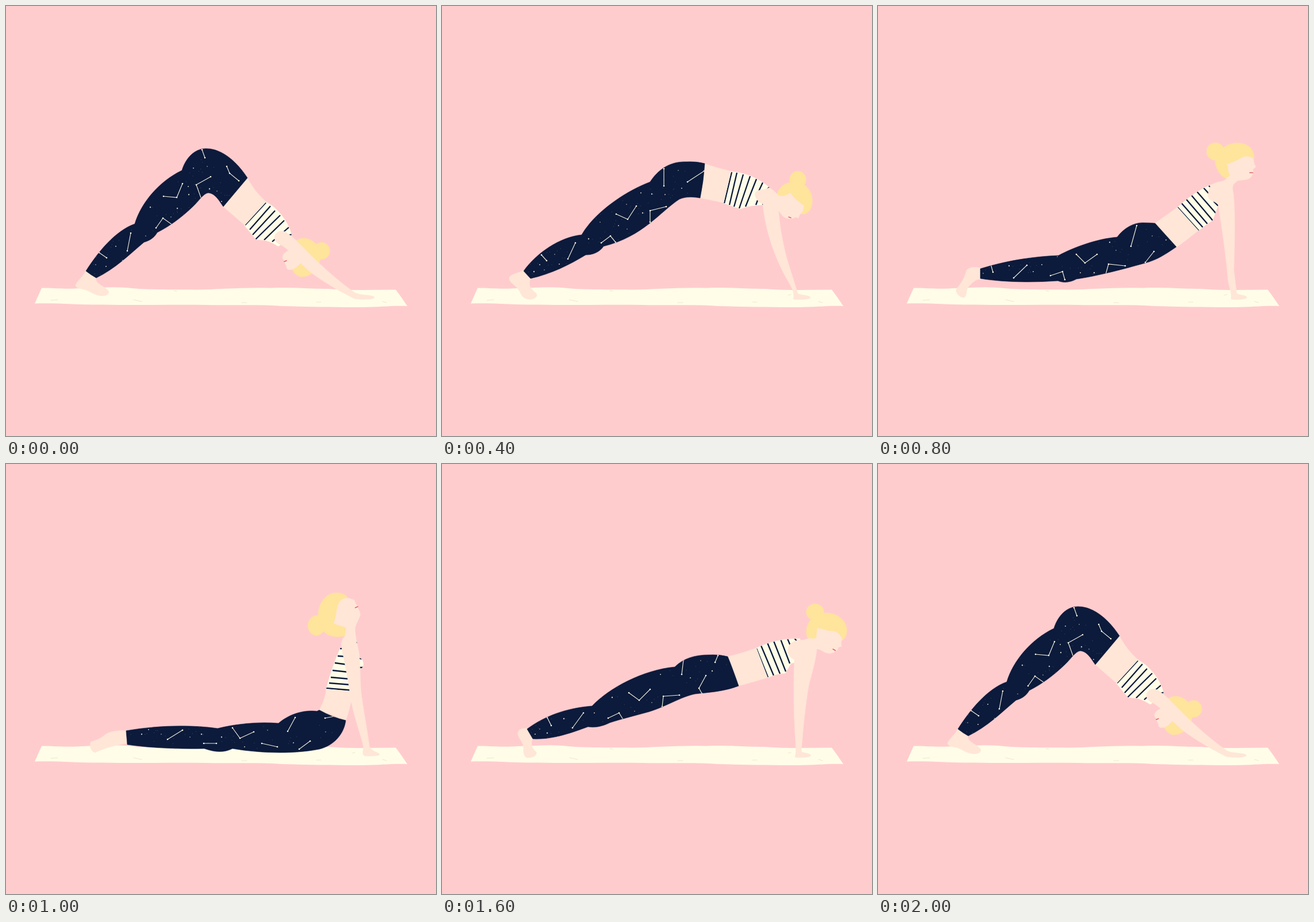
Animation of 748 by 748 pixels, one loop 2200 ms. Source, as an HTML page:

```html
<!DOCTYPE html>
<html lang="en">
<head>
<meta charset="utf-8">
<title>Yoga flow</title>
<style>
html, body { margin: 0; width: 100%; height: 100%; overflow: hidden; background: #ffccce; }
svg { display: block; width: 100vw; height: 100vh; }
</style>
</head>
<body>
<svg id="stage" viewBox="0 0 748 748">
  <rect width="748" height="748" fill="#ffccce"/>
  <path fill="#fffde8" d="M62 490.5C85 490 100 493 130 491C160 490 185 488 210 490C240 494 290 493 330 493.500C370 493 410 489 460 490.500C500 489 525 492 560 492C600 495 640 494 678 493.500Q689 508 698 522C670 521 650 524 620 524C570 524 520 523 480 522C440 519 400 521 350 520C290 519 230 521 170 519.500C130 520 85 516 50 517.500Z"/>
  <g fill="none" stroke="#efe6cf" stroke-width="1" stroke-linecap="round">
    <path d="M292 495l5 1M222 511l14 3M602 503l5-1M78 512l12-1M410 516l9 0M655 514l7 2M540 515l8 0"/>
  </g>
</svg>
<script>
const NS = "http://www.w3.org/2000/svg";
const NAVY = "#0c1a3b", SKIN = "#ffe6d7", HAIR = "#ffe49b", CREAM = "#fffde8", LIPS = "#e2626a";
const stage = document.getElementById("stage");

// bun: cx cy rx ry; lines and dots: points in stage units
const poses = {
  dog: {
    bun: [549, 426, 14.5, 15],
    hair: "M497 425C498 412 507 404 518 404C534 405 546 417 547 434C547 455 532 471 514 471C506 470 500 464 497 455Z",
    face: "M500 424C489 425 481 430 481 438L484 443L486 449L488 452C487 458 492 460 498 458C504 456 509 451 514 445L512 428Z",
    lips: "M484 444.500L488 443",
    foot: "M139 460C134 472 124 477 121 486C122 492 132 491 142 495C151 500 160 505 171 504C181 502 181 496 173 491C163 484 154 480 157 472Z",
    torso: "M420 299C428 315 440 330 453 341L416 382L378 349Z",
    legs: "M139 461C160 428 190 391 224 379C234 345 264 306 306 286C312 266 327 248 348 248C377 248 403 273 420 299L378 349C371 339 364 326 352 325C343 326 335 340 325 349C304 369 286 382 263 394C258 403 250 408 240 411C215 432 190 457 157 473Q148 468 139 461Z",
    top: "M452.500 341C474 352 492 377 497 399L474 418C466 414 456 407 445 407L435 406L415 382Z",
    stripes: "M452 342L416 381M460 348L424 389M468 356L429 398M477 364L434 406M484 373L449 407M492 385L463 410M499 397L490 399",
    arm: "M467 404C467 394 477 389 486 393C496 399 506 409 518 421C542 446 573 475 607 499C618 504 639 502 641 507C639 511 618 511 606 509C586 499 560 485 531 464C512 449 494 425 481 417C474 414 468 410 467 404Z",
    lines: "341,250 346,264;356,297 331,311 340,336;274,331 297,333 307,309;384,279 389,291 405,304;261,386 273,369 290,381;217,395 211,426;162,429 175,438",
    dots: "350,279 326,282 318,328 367,322 317,314 251,350 156,450 191,418 298,352 287,367 174,453 203,443 243,400 375,340 354,318"
  },
  pike: {
    bun: [619, 302, 14.5, 15],
    hair: "M583 332C583 315 599 305 616 306C635 308 645 325 644 341C643 355 636 362 627 362L600 340Z",
    face: "M580 326C592 336 602 327 606 325C612 335 622 342 629 347C629 355 627 360 622 363L620 369L615 367C609 372 596 371 590 362L580 348Z",
    lips: "M603 367L607 368.500",
    foot: "M142 459C135 465 117 466 117 474C118 483 132 487 137 500C140 508 148 511 156 510C166 508 167 502 162 498C153 492 149 483 155 473Z",
    torso: "M456 274C475 281 490 284 504 288L491 343C478 339 465 337 449 334Z",
    legs: "M142 461C165 429 205 402 243 398C262 364 312 325 362 306C375 286 395 270 425 271Q442 270 457 274Q455 305 449 334C437 332 425 331 413 336C379 358 350 401 281 418C275 427 264 433 250 433C222 450 190 466 154 474Z",
    top: "M503 288C527 290 550 299 570 316L562 346C545 346 531 348 519 353L490 343Z",
    stripes: "M504 289L491 343M513 290L500 346M524 293L508 349M536 296L517 352M547 301L528 349M558 307L551 322M570 314L565 320M549 338L546 346M559 341L558 347",
    arm: "M545 325C549 318 561 321 569 316C578 321 583 327 588 333L585 348C586 375 592 410 600 440C608 465 615 488 619 500C625 504 638 502 641 507C640 511 620 511 611 510C615 499 607 488 600 475C580 440 562 390 558 344C549 341 543 332 545 325Z",
    lines: "386,283 386,313;427,306 456,287;303,362 323,371 338,348;362,376 362,356 390,349;277,412 293,400 302,411;232,412 219,440;173,433 182,443",
    dots: "411,286 388,328 375,380 321,345 346,325 349,360 275,376 307,382 255,405 196,432 170,450 160,462 178,459 204,449 365,327 322,388 417,317"
  },
  plank: {
    bun: [649, 257.500, 15.5, 14.5],
    hair: "M634 296C632 272 650 259 670 259C692 261 705 275 704 292C703 300 700 305 696 306L645 307Q635 306 634 296Z",
    face: "M653 286C662 286 670 291 680 291Q690 291 696 305L694 311L695 317L689 319C689 323 687 325 684 326C680 330 673 330 667 328C661 325 656 321 650 322L634 306L651 303Z",
    lips: "M680 322L684.500 324.500",
    foot: "M149 460C138 459 131 463 132 470C134 479 142 484 142 495C141 503 143 509 148 511C156 511 166 508 164 501C157 496 154 488 157 478Z",
    torso: "M497 335Q520 330 547 320L568 371Q545 378 516 386Z",
    legs: "M148 461C180 437 220 424 261 421C290 390 350 358 405 353C420 338 440 332 465 332Q482 331 497 335Q503 349 516 386C490 396 465 397 440 400C415 405 390 422 360 431C335 438 310 444 292 450C278 457 265 459 254 457C225 468 190 480 158 478Z",
    top: "M547 320C570 309 595 303 623 304L615 345L607 347L597 364Q582 364 567 372Z",
    stripes: "M547 321L567 371M555 316L577 368M566 311L588 365M577 308L598 361M589 305L605 347M601 304L607 318M613 303L618 309",
    arm: "M602 322C603 311 614 307 622 306C630 308 635 303 642 303L652 319C651 340 643 365 638 385C632 420 628 460 625 500C630 504 639 502 642 507C640 511 620 511 614 510C617 500 615 493 615 480C612 440 611 390 613 340C606 338 601 330 602 322Z",
    lines: "420,341 417,366;480,333 475,345;459,368 447,390 452,399;325,398 343,411 362,392;383,422 385,404 413,402;289,442 308,433 316,446;246,433 227,459;183,441 190,455",
    dots: "450,342 432,372 296,406 335,430 380,366 212,443 170,461 162,470 183,468 365,415 265,433 470,360"
  },
  dip: {
    bun: [587, 253, 15.5, 15.5],
    hair: "M586 267C590 250 608 238 627 238C645 240 655 250 654 265L620 275L612 299C602 304 588 288 586 267Z",
    face: "M607 275C619 273 629 265 638 262Q648 261 653 266L654 273L657 280L652 284C653 288 652 292 650 296C645 304 632 302 625 304L612 316L600 306L613 294C608 289 611 282 607 275Z",
    lips: "M646.500 290L652 290",
    foot: "M178 456C166 453 158 455 154 460C150 475 143 484 136 493C135 500 143 508 150 507C156 502 152 495 157 489C165 480 170 475 179 475Z",
    torso: "M482 378L521 350L558 390Q538 406 519 420Z",
    legs: "M178 457C220 444 265 436 314 434C340 420 380 405 416 402C428 386 445 377 460 377Q473 377 482 378Q500 398 519 419C500 432 485 442 465 447C430 457 380 470 345 475C335 481 322 482 313 478C270 481 220 481 178 474Z",
    top: "M521 350C540 333 560 318 580 311L592 346L582 373Q570 380 558 391Z",
    stripes: "M521 350L558 391M528 343L565 385M536 336L573 379M545 329L583 374M554 322L589 362M566 316L577 328M575 312L580 317M584 340L592 348",
    arm: "M574 330C575 321 577 314 580 311C590 305 600 306 605 302L622 305C616 311 616 318 618 325C622 360 620 420 619 460L624 500C630 504 639 502 642 507C640 511 620 511 614 510C616 500 611 490 609 478C605 430 598 385 592 346C586 338 575 340 574 330Z",
    lines: "450,382 440,418;480,427 465,446;345,432 360,447 381,432;396,467 401,449 430,452;300,469 321,462 325,476;259,451 236,473;196,449 200,463",
    dots: "477,400 501,407 403,411 414,425 352,464 376,464 312,436 270,462 228,452 183,465 285,450"
  },
  cobra: {
    bun: [540, 281, 15, 17.5],
    hair: "M543 265C543 240 558 224 575 224C586 224 593 228 595 235L582 276L592 283L590 299C580 301 568 301 560 297C550 290 543 280 543 265Z",
    face: "M579 243C580 235 592 232 598 234L606 237L608 243L612 247C610 252 617 255 616 263C613 273 607 279 607 290L610 312L588 310L592 284C584 282 577 280 570 277C575 268 574 252 579 243Z",
    lips: "M607.500 250L612 248",
    foot: "M210 464C195 463 180 465 172 471C165 478 155 481 148 483C144 490 148 500 155 502C162 498 170 496 178 493C190 490 200 487 212 486Z",
    torso: "M545 428Q557 405 557 391L599 394L602 405Q597 430 591 446Z",
    legs: "M209 464C260 455 320 453 368 460C400 452 440 448 474 451C490 437 515 427 541 430L545 428Q568 441 591 446C588 470 570 490 545 496C500 505 440 503 394 495C380 502 365 502 345 495C300 496 250 494 211 488Z",
    top: "M557 391Q568 350 582 319L610 308L614 337C622 338 624 352 618 356L604 357L598 395Z",
    stripes: "M581 321L590 321M577 334L592 335M572 346L594 349M568 359L596 362M565 371L598 374M562 381L599 384M557 390L600 393.500M614 338L620 339M614 354L623 354M607 309L613 312",
    arm: "M591 299C582 304 583 315 585 325C592 360 597 385 599 405C605 440 619 475 622 493C620 503 620 508 626 508C638 508 650 508 650 505C646 500 634 500 632 490C628 460 622 430 618 400C615 370 617 340 613 323C611 314 607 306 607 288Z",
    lines: "503,441 490,465;529,482 510,496;555,442 571,439;394,459 407,477 431,466;445,486 472,492;344,486 366,486;307,463 281,479",
    dots: "556,466 248,462 236,470 270,470 415,492 340,470 455,463 500,485 375,475 320,475"
  }
};

const flow = ["dog", "dog", "pike", "plank", "dip", "cobra", "cobra", "dip", "plank", "pike", "dog"];
const STEP = 200;

function add(parent, tag, attrs) {
  const el = document.createElementNS(NS, tag);
  for (const k in attrs) el.setAttribute(k, attrs[k]);
  return parent.appendChild(el);
}

function shape(g, d, fill) {
  return add(g, "path", { d, fill, stroke: fill, "stroke-width": 0.6, "stroke-linejoin": "round" });
}

function clip(g, id, d) {
  add(add(g, "clipPath", { id }), "path", { d });
  return add(g, "g", { "clip-path": `url(#${id})` });
}

function star(g, p, r, opacity) {
  add(g, "circle", { cx: p[0], cy: p[1], r, fill: CREAM, opacity });
}

const points = s => s.split(" ").map(p => p.split(",").map(Number));

function drawStars(g, pose) {
  pose.lines.split(";").forEach(s => {
    add(g, "polyline", { points: s, fill: "none", stroke: CREAM, "stroke-width": 1.2, opacity: 0.9 });
    points(s).forEach(p => star(g, p, 1.3, 0.95));
  });
  points(pose.dots).forEach((p, i) => star(g, p, 0.8 + (i % 3) * 0.2, 0.75));
  // faint dust scattered near the larger stars
  let seed = 7;
  const rnd = () => (seed = seed * 16807 % 2147483647) / 2147483647;
  for (const p of points(pose.dots))
    for (let i = 0; i < 4; i++)
      star(g, [p[0] + rnd() * 50 - 25, p[1] + rnd() * 40 - 20], 0.5, 0.3);
}

function build(name) {
  const p = poses[name];
  const g = add(stage, "g", { visibility: "hidden" });
  const [cx, cy, rx, ry] = p.bun;
  add(g, "ellipse", { cx, cy, rx, ry, fill: HAIR });
  shape(g, p.hair, HAIR);
  shape(g, p.face, SKIN);
  shape(g, p.foot, SKIN);
  shape(g, p.torso, SKIN);
  shape(g, p.legs, NAVY);
  drawStars(clip(g, name + "-legs", p.legs), p);
  shape(g, p.top, CREAM);
  add(clip(g, name + "-top", p.top), "path", { d: p.stripes, stroke: NAVY, "stroke-width": 2.3, fill: "none" });
  shape(g, p.arm, SKIN);
  add(g, "path", { d: p.lips, stroke: LIPS, "stroke-width": 1.5, "stroke-linecap": "round" });
  return g;
}

const groups = {};
for (const name in poses) groups[name] = build(name);

function render(t) {
  const now = flow[Math.floor(t / STEP) % flow.length];
  for (const name in groups)
    groups[name].setAttribute("visibility", name === now ? "visible" : "hidden");
}

const start = performance.now();
function tick() {
  render(performance.now() - start);
  requestAnimationFrame(tick);
}
render(0);
requestAnimationFrame(tick);
</script>
</body>
</html>
```
